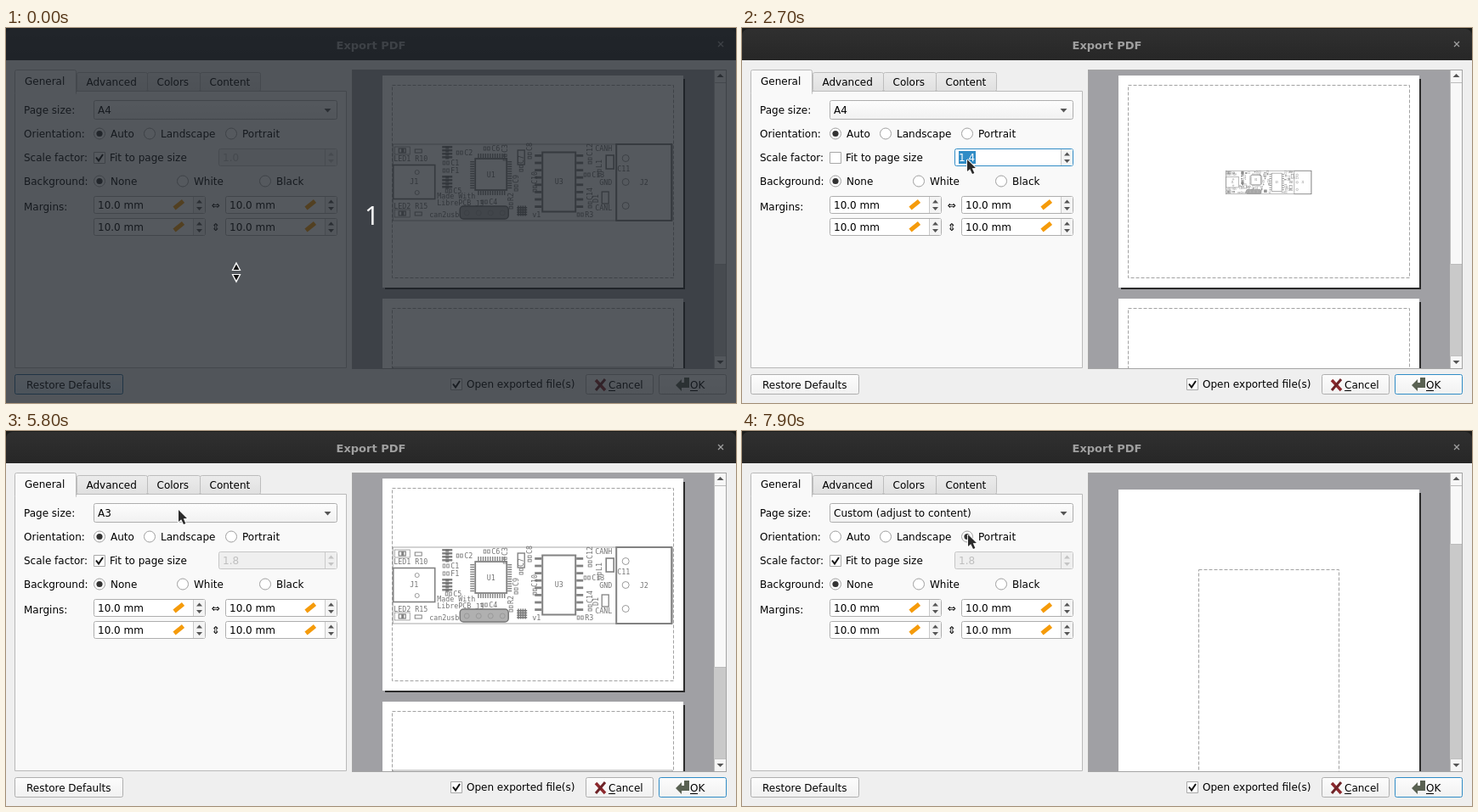
Animation, 859 px wide and 442 px high, one loop 8 s. Source, as an HTML page with a canvas:

```html
<!DOCTYPE html>
<html lang="en">
<head>
<meta charset="utf-8">
<title>Export PDF</title>
<style>
html, body { margin: 0; width: 100%; height: 100%; overflow: hidden; background: #efefef; }
canvas { display: block; }
</style>
</head>
<body>
<canvas id="stage" width="859" height="442"></canvas>
<script>
const ctx = document.getElementById('stage').getContext('2d');
const LOOP = 8000, TICK = 100;
const BLUE = '#308cc6', BORDER = '#aeaeae', INK = '#000', PCB = '#828282';
const SANS = '"DejaVu Sans", sans-serif', MONO = '"DejaVu Sans Mono", monospace';

// State as a function of time
const clamp = (v, lo, hi) => Math.min(hi, Math.max(lo, v));
const clicks = (t, start, every, count) => clamp(Math.floor((t - start) / every) + 1, 0, count);
const scaleAt = t => 1 + .1 * (clicks(t, 2400, 100, 5) + clicks(t, 3000, 100, 3));
const sizeStep = t => clicks(t, 5800, 150, 5);
const isFit = t => t < 1200 || t >= 4300;
const isPortrait = t => t >= 7500;

function stateAt(t) {
  const step = sizeStep(t), seen = t - TICK; // the preview lags one tick behind the form
  return {
    sizeName: step < 5 ? 'A' + (4 - step) : 'Custom (adjust to content)',
    scale: scaleAt(t),
    fit: isFit(t),
    editing: t >= 2400 && t < 4300,
    portrait: isPortrait(t),
    started: t >= 1100,
    preview: { step: sizeStep(seen), fit: isFit(seen), portrait: isPortrait(seen) }
  };
}

// Pointer moves: start, end, and where it arrives
const moves = [[100, 800, 181, 149], [1600, 1900, 225, 163], [1900, 2200, 265, 155], [3400, 3700, 247, 155],
  [3700, 4200, 108, 154], [4600, 5200, 203, 93], [6900, 7400, 277, 123], [7700, 7900, 266, 122]];

function pointerAt(t) {
  let x = 261, y = 274;
  for (const [start, end, toX, toY] of moves) {
    const p = clamp((t - start) / (end - start), 0, 1), ease = p * p * (3 - 2 * p);
    x += (toX - x) * ease;
    y += (toY - y) * ease;
  }
  return [Math.round(x), Math.round(y)];
}

// Drawing helpers
function fill(color, x, y, w, h) {
  ctx.fillStyle = color;
  ctx.fillRect(x, y, w, h);
}

function text(str, x, y, color = INK, font = '12px ' + SANS) {
  ctx.font = font;
  ctx.fillStyle = color;
  ctx.fillText(str, x, y);
}

function shade(y, h, top, bottom) {
  const g = ctx.createLinearGradient(0, y, 0, y + h);
  g.addColorStop(0, top);
  g.addColorStop(1, bottom);
  return g;
}

function box(x, y, w, h, paint, border = BORDER, radius = 2) {
  ctx.beginPath();
  ctx.roundRect(x + .5, y + .5, w - 1, h - 1, radius);
  ctx.fillStyle = paint;
  ctx.fill();
  ctx.strokeStyle = border;
  ctx.lineWidth = 1;
  ctx.stroke();
}

function path(points, color, width) {
  ctx.beginPath();
  points.forEach(([x, y]) => ctx.lineTo(x, y));
  if (width) {
    ctx.strokeStyle = color;
    ctx.lineWidth = width;
    ctx.stroke();
  } else {
    ctx.fillStyle = color;
    ctx.fill();
  }
}

// Triangle whose tip points down when h > 0 and up when h < 0
const arrow = (x, y, w, h, color = '#555') => path([[x - w / 2, y], [x + w / 2, y], [x, y + h]], color);

function circle(x, y, r, stroke, paint, width = 1) {
  ctx.beginPath();
  ctx.arc(x, y, r, 0, 7);
  if (paint) { ctx.fillStyle = paint; ctx.fill(); }
  if (stroke) { ctx.strokeStyle = stroke; ctx.lineWidth = width; ctx.stroke(); }
}

// Widgets
function radio(label, x, y, on) {
  circle(x, y + .5, 6.5, '#a0a0a0', '#fff');
  if (on) circle(x, y + .5, 3.6, null, '#333');
  text(label, x + 13, y + 5);
}

function checkbox(label, x, y, on) {
  box(x, y, 14, 14, '#fff', '#a8a8a8', 0);
  if (on) path([[x + 3, y + 6.5], [x + 6, y + 10.5], [x + 11, y + 3]], '#111', 2);
  text(label, x + 19, y + 11);
}

function spinBox(x, y, w, value, { enabled = true, focused = false, ruler = false } = {}) {
  box(x, y, w, 21, enabled ? '#fff' : '#efefef', focused ? BLUE : enabled ? BORDER : '#c6c6c6');
  fill(enabled ? '#f4f4f4' : '#efefef', x + w - 14, y + 1, 13, 19);
  fill('#cacaca', x + w - 15, y + 1, 1, 19);
  const tint = enabled ? '#555' : '#c4c4c4', mid = x + w - 7.5;
  arrow(mid, y + 8.5, 7, -4, tint);
  arrow(mid, y + 13, 7, 4, tint);
  if (focused) fill(BLUE, x + 5, y + 3, 20, 15);
  text(value, x + 5, y + 15, focused ? '#fff' : enabled ? INK : '#bebebe');
  if (ruler) path([[x + 95, y + 14.5], [x + 105.5, y + 6]], '#f59b0b', 5);
}

function button(x, w, label, textX, border = BORDER, top = '#fdfdfd', bottom = '#f1f1f1') {
  box(x, 408, w, 24, shade(408, 24, top, bottom), border);
  text(label, textX, 425);
}

function drawForm({ sizeName, scale, fit, editing, portrait }) {
  box(10, 74, 391, 327, '#f9f9f9', '#b9b9b9', 0);
  [['Advanced', 83, 84], ['Colors', 166, 63], ['Content', 228, 72]].forEach(([label, x, w]) => {
    box(x, 52, w, 23, shade(52, 22, '#ececec', '#e0e0e0'), '#bdbdbd');
    text(label, x + 11.5, 68);
  });
  box(10, 49, 73, 30, '#f9f9f9', '#b9b9b9');
  fill('#f9f9f9', 11, 74, 71, 7);
  text('General', 22, 67);

  ['Page size:', 'Orientation:', 'Scale factor:', 'Background:'].forEach((label, i) => text(label, 21, 101 + i * 28));
  text('Margins:', 21, 215);
  box(103, 85, 287, 23, shade(85, 23, '#fdfdfd', '#f1f1f1'));
  text(sizeName, 108, 101);
  arrow(378.5, 95, 8, 4.5);

  radio('Auto', 110, 124, !portrait);
  radio('Landscape', 169, 124);
  radio('Portrait', 265, 124, portrait);
  ['None', 'White', 'Black'].forEach((label, i) => radio(label, Math.round(110 + i * 97.5), 180, !i));

  checkbox('Fit to page size', 103, 146, fit);
  spinBox(250, 142, 140, scale.toFixed(1), { enabled: !fit, focused: editing });
  for (const y of [198, 224]) {
    for (const x of [103, 258]) spinBox(x, y, 132, '10.0 mm', { ruler: true });
    text(y < 200 ? '⇔' : '⇕', 241.5, y + 15);
  }
}

function drawButtons({ started }) {
  if (started) button(10, 128, 'Restore Defaults', 24);
  else button(10, 128, 'Restore Defaults', 24, '#2a6d9b', '#f0f6fb', '#dce9f3');
  checkbox('Open exported file(s)', 523, 413, true);
  button(682, 80, 'Cancel', 709);
  button(768, 80, 'OK', 805, started ? BLUE : BORDER);
  fill(INK, 709, 427, 8, 1);
  fill(INK, 805, 427, 9, 1);
  path([[694, 415], [705, 427]], '#8c282d', 3.5);
  path([[705, 414], [694, 427]], '#6d2226', 3);
  path([[788, 421], [795, 414], [795, 418], [798, 418], [798, 412], [804, 412], [804, 424], [795, 424], [795, 428]], '#596152');
}

// Circuit board, laid out around its centre at (619.5, 182)
const boardFont = '8.3px ' + MONO;
const boardText = (s, x, y) => text(s, x, y, '#747474', boardFont);

function rect(x, y, w, h, width) {
  ctx.strokeStyle = PCB;
  ctx.lineWidth = width;
  ctx.strokeRect(x, y, w, h);
}

// Evenly spaced labels; the short ones name a two-pad part that sits just before the text
function series(names, x, y, dx, dy, upright) {
  names.forEach((name, i) => {
    ctx.save();
    ctx.translate(x + i * dx, y + i * dy);
    if (upright) ctx.rotate(-Math.PI / 2);
    boardText(name, 0, 0);
    if (/^[CFRL]\d+$/.test(name)) for (const pad of [-9, -4.5]) rect(pad, -5, 2.5, 4, .9);
    ctx.restore();
  });
}

function package_(name, x, y, w, h, width) {
  rect(x, y, w, h, width);
  boardText(name, x + w / 2 - 5, y + h / 2 + 3);
}

function boardBack(line) {
  rect(455, 137, 329, 90, line(.7));
  const hole = (x, y, r) => circle(x, y, r, '#999', null, line(1));
  for (let i = 0; i < 4; i++) {
    hole(542 + i * 14, 218, 3);
    if (i < 3) hole(729, 153.5 + i * 28, 4);
    if (i < 2) hole(483.5, 170 + i * 24, 2.5);
  }
}

function boardFront(line) {
  ctx.beginPath();
  ctx.roundRect(534, 210, 57, 15, 4);
  ctx.fillStyle = '#b0b0b0';
  ctx.fill();
  ctx.strokeStyle = '#777';
  ctx.lineWidth = line(1.5);
  ctx.stroke();
  boardBack(line);

  package_('J1', 455.5, 161.5, 49, 40, line(1.6));
  package_('U1', 552, 154, 37, 37, line(1.8));
  package_('U3', 631, 146.5, 39, 70, line(2));
  package_('J2', 718, 137, 65, 90, line(2));
  for (let i = 0; i < 12; i++) {
    for (const side of [148, 192]) {
      fill(PCB, 555 + i * 2.8, side, 1.4, 5);
      fill(PCB, side + 398, 157 + i * 2.8, 5, 1.4);
    }
  }
  for (let i = 0; i < 8; i++) for (const x of [622, 671]) fill(PCB, x, 149 + i * 8.6, 8, 2.8);
  for (let i = 0; i < 4; i++) {
    for (const top of [139, 174]) {
      fill(PCB, 513, top + i * 4, 12, 2.5);
      fill('#777', 517, top + i * 4, 4, 3.5);
    }
    fill('#777', 602 + i * 2.7, 209.5, 1.5, 12);
    fill('#777', 601, 211 + i * 2.7, 12, 1.5);
  }

  ['LED1 R10', 'LED2 R15'].forEach((name, i) => {
    const y = 140 + i * 74;
    boardText(name, 456, 157 + i * 56);
    rect(457, y, 18, 9, line(.7));
    rect(462, y + 2, 8, 5, line(1.2));
    fill(PCB, 465, y + 2, 3, 5);
    rect(481, y + 3, 8, 4, line(1));
  });
  rect(602, 144, 8, 17, line(1.4));
  rect(706, 150, 9, 16, line(1.6));
  rect(701, 193, 8, 14, line(1.3));

  series(['C1', 'F1'], 523, 162, 0, 9);
  series(['C2', 'C6'], 539, 150, 32, -5);
  series(['C5', 'C4'], 526, 195, 42, 13);
  series(['Made With', 'LibrePCB'], 507, 201, 0, 8);
  series(['C13', 'GND'], 689, 176, 9, 9);
  series(['CANH', 'CANL'], 693, 145, 0, 70);
  series(['can2usb', 'v1'], 498, 223, 121, 0);
  series(['J3', 'R3'], 552, 210, 129, 13);
  boardText('C11', 719, 169);
  series(['C3', 'C8'], 590, 147, 29, -2, true);
  series(['C9', 'C10'], 603, 183, 22, 1, true);
  series(['C7', 'R2'], 609, 160, -12, 44, true);
  series(['C12', 'C14'], 690, 151, 0, 52, true);
  series(['L1', 'D1'], 701, 165, -4, 41, true);
}

function placed(cx, cy, kx, ky, draw) {
  ctx.save();
  ctx.translate(cx, cy);
  ctx.scale(kx, ky);
  ctx.translate(-619.5, -182);
  draw(width => Math.max(width, .55 / ky));
  ctx.restore();
}

// Preview pane
function page(y, h, margin) {
  fill('#2b2b2b', 446, y + 4, 353, h - 2);
  fill('#fff', 443, y, 354, h);
  ctx.setLineDash([4, 2]);
  ctx.strokeStyle = '#a2a2a2';
  ctx.lineWidth = 1;
  const inset = Math.round(margin) - .5;
  ctx.strokeRect(443 + inset, y + inset, 354 - 2 * inset, h - 2 * inset);
  ctx.setLineDash([]);
}

function drawPages({ scale, preview }) {
  if (preview.portrait) {
    page(69, 775, 95);
    return 70;
  }
  if (preview.step === 5) {
    page(57, 165, 44);
    page(230, 162, 44);
    placed(620, 139.5, .8085, .8085, boardFront);
    placed(620, 311, -.8085, .8085, boardBack);
    return 322;
  }
  const margin = 3540 / (297 * Math.SQRT2 ** preview.step);
  const k = preview.fit ? (354 - 2 * margin) / 330.2 : scale * .2188;
  page(56, 250, margin);
  page(319, 250, margin);
  placed(619.7, 182, k, k, boardFront);
  placed(619.7, 445, -k, k, boardBack);
  return 215;
}

function drawPreview(state) {
  ctx.save();
  ctx.beginPath();
  ctx.rect(407, 49, 441, 353);
  ctx.clip();
  fill('#a0a0a4', 407, 49, 441, 353);
  const handle = drawPages(state);
  ctx.restore();

  fill('#c9c9c9', 833, 50, 14, 351);
  for (const y of [49, 386]) box(833, y, 15, 16, '#f6f6f6', '#c0c0c0', 0);
  box(833, 64, 15, handle, '#f8f8f8', '#bcbcbc', 0);
  arrow(840.5, 58, 8, -4);
  arrow(840.5, 392, 8, 4);
  ctx.strokeStyle = '#a4a4a4';
  ctx.lineWidth = 1;
  ctx.strokeRect(407.5, 49.5, 440, 352);
}

function drawWindow() {
  fill('#efefef', 0, 0, 859, 442);
  fill('#1b1c1a', 0, 0, 859, 38);
  ctx.beginPath();
  ctx.roundRect(0, 1, 859, 37, [8, 8, 0, 0]);
  ctx.fillStyle = shade(0, 38, '#303030', '#272727');
  ctx.fill();
  text('Export PDF', 388.5, 25, '#a0a0a0', 'bold 13px ' + SANS);
  path([[838, 16], [844, 22]], '#a0a0a0', 1.3);
  path([[844, 16], [838, 22]], '#a0a0a0', 1.3);
}

function drawPointer(t) {
  ctx.save();
  ctx.translate(...pointerAt(t));
  const outline = [[0, 0], [0, 14], [3.2, 11.2], [6, 17], [8.4, 16], [5.8, 10.3], [10, 10], [0, 0]];
  path(outline, '#fff', 1.8);
  path(outline, '#2b2b2b');
  ctx.restore();
}

function drawCountdown() {
  fill('rgba(28, 34, 40, .75)', 0, 0, 859, 442);
  text('1', 422, 232, '#f4f4f4', '30px "Noto Sans", sans-serif');
  for (const [y, h] of [[286, -8], [290, 8]]) {
    arrow(271, y, 11, h * 1.3, '#fff');
    arrow(271, y + h / 8, 7, h * .8, '#111');
  }
}

function render(now) {
  const t = Math.floor(now % LOOP / TICK) * TICK, state = stateAt(t);
  drawWindow();
  drawForm(state);
  drawPreview(state);
  drawButtons(state);
  if (t < TICK) drawCountdown();
  else drawPointer(t);
}

let start;
function tick(now) {
  start ??= now;
  render(now - start);
  requestAnimationFrame(tick);
}
render(0);
requestAnimationFrame(tick);
</script>
</body>
</html>
```
